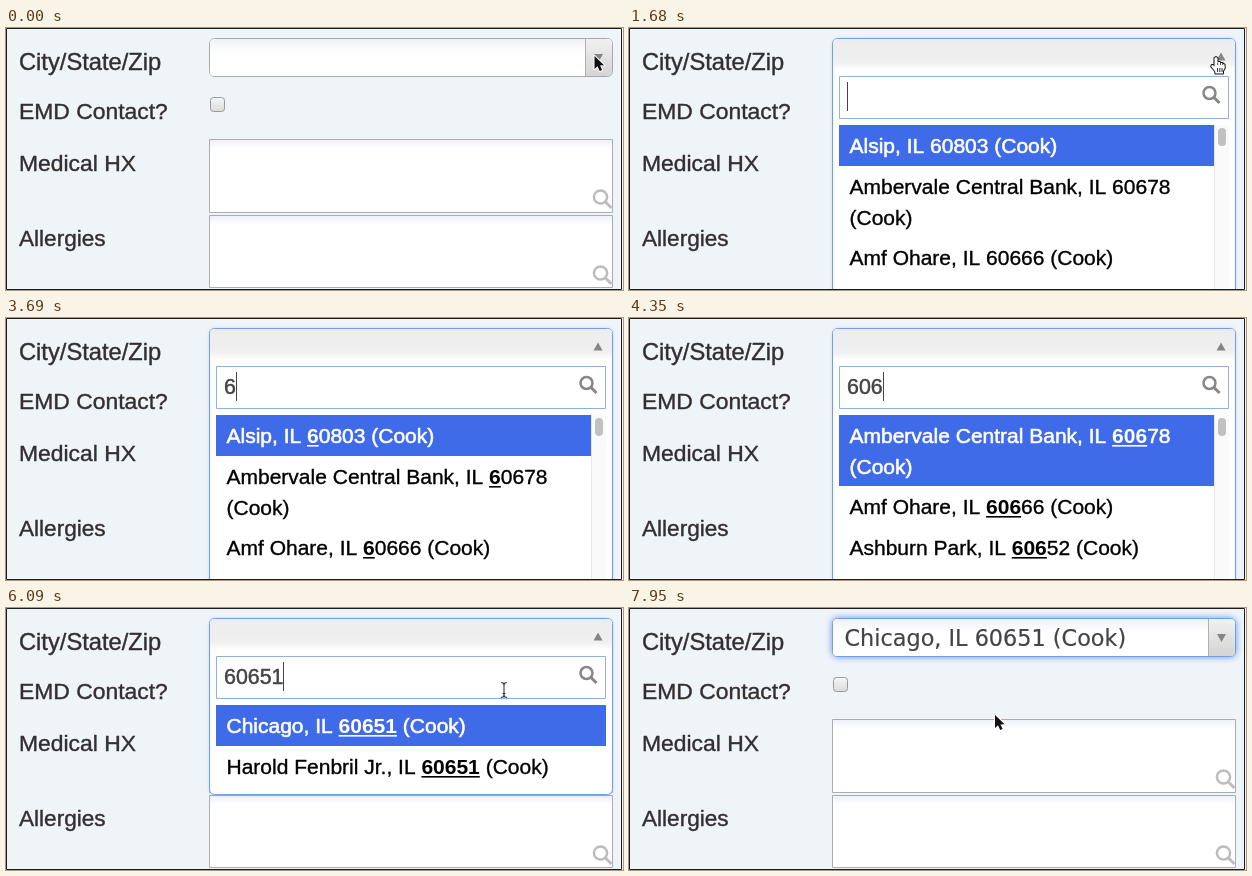
An HTML page with a canvas that plays this animation: 617 px wide and 262 px high, repeating every 8 s.

```html
<!DOCTYPE html>
<html lang="en">
<head>
<meta charset="utf-8">
<title>City picker</title>
<style>
  html, body { margin: 0; width: 617px; height: 262px; overflow: hidden; }
  canvas { display: block; }
</style>
</head>
<body>
<canvas id="stage" width="617" height="262"></canvas>
<script>
const ctx = document.getElementById('stage').getContext('2d');
const LOOP = 8000, STEP = 30;
const OPEN = 1680, CLOSE = 6840;
const SANS = '"Liberation Sans", Arial, sans-serif';
const BLUE = '#6f9fe8', PAGE = '#eff4f9';

const keys = [[3600, '6'], [3870, '60'], [4020, '606'], [4470, '6065'], [4920, '60651']];
const caretOff = [[2160, 2430], [2910, 3180], [5400, 5760], [6240, 6510]];

const bank = ['Ambervale Central Bank', '60678'];
const alsip = ['Alsip', '60803'], ohare = ['Amf Ohare', '60666'];
const ashburn = ['Ashburn Park', '60652'], chicago = ['Chicago', '60651'];

function results(query) {
  if (query.length < 3) return [alsip, bank, ohare];
  if (query === '606') return [bank, ohare, ashburn];
  if (query === '6065') return [ashburn, chicago, ['Chicago', '60652'], ['Chicago', '60655']];
  return [chicago, ['Harold Fenbril Jr.', '60651']];
}

// Pointer track: time, x, y
const toSearch = [[2400, 587, 29], [2460, 550, 47], [2550, 495, 71], [2730, 484.5, 79]];
const toResult = [[6090, 498, 82], [6240, 484, 85], [6450, 430, 99], [6600, 391, 109], [6720, 380, 112]];
const toRest = [[7650, 380, 112], [7740, 375, 110], [7920, 366, 107]];

function along(track, t) {
  if (t <= track[0][0]) return track[0].slice(1);
  for (let i = 1; i < track.length; i++) {
    const a = track[i - 1], b = track[i];
    if (t < b[0]) {
      const k = (t - a[0]) / (b[0] - a[0]);
      return [a[1] + (b[1] - a[1]) * k, a[2] + (b[2] - a[2]) * k];
    }
  }
  return track[track.length - 1].slice(1);
}

function vertical(y0, y1, ...stops) {
  const g = ctx.createLinearGradient(0, y0, 0, y1);
  stops.forEach((c, i) => g.addColorStop(i / (stops.length - 1), c));
  return g;
}

function box(x, y, w, h, r, fill, stroke) {
  ctx.beginPath();
  ctx.roundRect(x, y, w, h, r);
  if (fill) { ctx.fillStyle = fill; ctx.fill(); }
  if (stroke) { ctx.strokeStyle = stroke; ctx.lineWidth = 1; ctx.stroke(); }
}

function rect(x, y, w, h, fill) {
  ctx.fillStyle = fill;
  ctx.fillRect(x, y, w, h);
}

function poly(points, fill, stroke, width = 1) {
  ctx.beginPath();
  points.forEach(([x, y]) => ctx.lineTo(x, y));
  ctx.closePath();
  if (stroke) { ctx.strokeStyle = stroke; ctx.lineWidth = width; ctx.stroke(); }
  ctx.fillStyle = fill;
  ctx.fill();
}

// Draws text and returns the x where it ends
function text(str, x, y, size, color, { weight = '', family = SANS, thicken = 0.4 } = {}) {
  ctx.font = `${weight} ${size}px ${family}`;
  ctx.fillStyle = ctx.strokeStyle = color;
  ctx.lineWidth = thicken;
  ctx.lineJoin = 'round';
  ctx.fillText(str, x, y);
  if (thicken) ctx.strokeText(str, x, y);
  return x + ctx.measureText(str).width;
}

function lens(x, y, r, reach, color) {
  ctx.strokeStyle = color;
  ctx.lineWidth = 2.5;
  ctx.beginPath();
  ctx.arc(x, y, r, 0, Math.PI * 2);
  ctx.stroke();
  ctx.lineWidth = 3;
  ctx.beginPath();
  ctx.moveTo(x + r * 0.75, y + r * 0.75);
  ctx.lineTo(x + reach, y + reach);
  ctx.stroke();
}

function triangle(x, y, dir) {
  poly([[x - 4.5, y - 4 * dir], [x + 4.5, y - 4 * dir], [x, y + 4 * dir]], '#858585');
}

function textArea(y, h) {
  box(203.5, y + 0.5, 403, h, 0, vertical(y, y + 10, '#eceff5', '#ffffff'), '#a9acb1');
  lens(594.5, y + 58, 6.6, 11, '#bdbdbd');
}

function form() {
  rect(0, 0, 617, 262, PAGE);
  [['City/State/Zip', 42, 23.7], ['EMD Contact?', 91, 22.9], ['Medical HX', 143, 22.9], ['Allergies', 218, 22.6]]
    .forEach(([label, y, size]) => text(label, 13, y, size, '#332f31'));
  box(204.5, 69.5, 14, 14, 3, vertical(69, 84, '#f7f7f7', '#dadada'), '#999999');
  textArea(111, 73);
  textArea(187, 72);
}

function closedSelect(chosen) {
  ctx.save();
  if (chosen) { ctx.shadowColor = 'rgba(70,125,225,.75)'; ctx.shadowBlur = 6; }
  box(203.5, 10.5, 403, 38, 5, '#ffffff', chosen ? BLUE : '#a5a8ad');
  ctx.restore();
  box(204, 11, 375, 37, [4, 0, 0, 4], vertical(11, 26, '#f1f2f5', '#ffffff'));
  box(579, 11, 27, 37, [0, 4, 4, 0], vertical(11, 48, '#f1f1f1', '#d4d4d4'));
  rect(579, 11, 1, 37, '#b0b0b0');
  triangle(592.5, 30, 1);
  if (chosen) {
    text('Chicago, IL 60651 (Cook)', 215.5, 38, 22.35, '#444444', { family: '"DejaVu Sans", sans-serif', thicken: 0.2 });
  }
}

function resultRow([place, zip], query, top, right, active) {
  const size = 21, color = active ? '#ffffff' : '#000000';
  const style = { thicken: active ? 0.6 : 0.35 };
  ctx.font = `${size}px ${SANS}`;
  const head = `${place}, IL `;
  const wraps = ctx.measureText(`${head}${zip} (Cook)`).width > 355;
  const height = wraps ? 71 : 41, base = top + 28;
  if (active) rect(210, top, right - 210, height, '#406be8');
  let x = text(head, 220.5, base, size, color, style);
  if (query) {
    const end = text(query, x, base, size, color, { weight: 'bold', thicken: 0 });
    rect(x, base + 2, end - x, 1.6, color);
    x = end;
  }
  x = text(zip.slice(query.length), x, base, size, color, style);
  if (wraps) text('(Cook)', 220.5, base + 30.5, size, color, style);
  else text(' (Cook)', x, base, size, color, style);
  return top + height;
}

function openSelect(query, caret) {
  const short = query.length === 5;
  const bottom = short ? 186.5 : 290;
  ctx.save();
  ctx.shadowColor = 'rgba(60,100,180,.15)';
  ctx.shadowBlur = 3;
  box(203.5, 10.5, 403, bottom - 10.5, 5, '#ffffff', BLUE);
  ctx.restore();
  box(204, 11, 402, 31, [4, 4, 0, 0], vertical(11, 42, '#ececec', '#eeeeee', '#eeeeee', '#f0f0f0', '#ffffff'));
  triangle(592, 28.5, -1);

  box(210.5, 48.5, 389, 42, 0, '#ffffff', '#8fb1de');
  lens(580.5, 65, 6, 10, '#878787');
  const end = text(query, 218, 76, 21.4, '#444444', { thicken: 0.5 });
  if (caret) rect(Math.round(end), 54, 1, 29, '#444444');

  let top = 97;
  results(query).forEach((row, i) => {
    top = resultRow(row, query, top, short ? 600 : 585, i === 0);
  });
  if (!short) {
    rect(585, 97, 15, 165, '#fafafa');
    rect(585, 97, 1, 165, '#e8e8e8');
    box(589, 100, 8, 18, 4, '#c1c1c1');
  }
}

function arrow(x, y) {
  const shape = [[0, 0], [0, 13], [3, 10.3], [5.2, 15], [7.6, 14], [5.5, 9.4], [9.6, 9.2]]
    .map(([a, b]) => [x + a, y + b]);
  poly(shape, '#111111', '#ffffff', 2);
}

function hand(x, y) {
  ctx.save();
  ctx.translate(x, y);
  ctx.lineJoin = 'round';
  poly([[-1.5, 1], [0, 0], [1.5, 1], [1.5, 5], [4, 5], [4.3, 6], [6.5, 6], [7, 7], [8.5, 7.4], [8.8, 11],
    [7, 14], [7, 16.5], [-0.5, 16.5], [-0.8, 14.5], [-4.8, 9.4], [-4.3, 8], [-2.8, 8.2], [-1.5, 9.6]],
    '#ffffff', '#111111', 2);
  ctx.fillStyle = '#111111';
  [1.2, 3.4, 5.6].forEach(a => ctx.fillRect(a, 11, 0.9, 4));
  [1.4, 4, 6.4].forEach(a => ctx.fillRect(a, 5.5, 0.7, 2.5));
  ctx.restore();
}

function beam(x, y) {
  ctx.strokeStyle = '#333333';
  ctx.lineWidth = 1.1;
  ctx.beginPath();
  ctx.moveTo(x - 3, y - 7.5);
  ctx.quadraticCurveTo(x, y - 7.5, x, y - 5);
  ctx.lineTo(x, y + 5);
  ctx.quadraticCurveTo(x, y + 7.5, x - 3, y + 7.5);
  ctx.moveTo(x + 3, y - 7.5);
  ctx.quadraticCurveTo(x, y - 7.5, x, y - 5);
  ctx.moveTo(x, y + 5);
  ctx.quadraticCurveTo(x, y + 7.5, x + 3, y + 7.5);
  ctx.moveTo(x - 1.5, y + 3.5);
  ctx.lineTo(x + 1.5, y + 3.5);
  ctx.stroke();
}

function pointer(t) {
  if (t < 510) return arrow(588.5, 28);
  if (t < 3420) {
    const [x, y] = along(toSearch, t);
    return y < 48 ? hand(x, y) : beam(x, y);
  }
  if (t < 6090) return; // hidden while typing
  if (t < 7680) {
    const [x, y] = along(toResult, t);
    return y < 91 ? beam(x, y) : hand(x, y);
  }
  arrow(...along(toRest, t));
}

function draw(t) {
  form();
  if (t >= OPEN && t < CLOSE) {
    const typed = keys.filter(k => t >= k[0]).pop();
    openSelect(typed ? typed[1] : '', !caretOff.some(([a, b]) => t >= a && t < b));
  } else {
    closedSelect(t >= CLOSE);
  }
  pointer(t);
  box(0.5, 0.5, 615, 261, 0, null, '#1c1c1c');
}

const start = performance.now();
function tick(now) {
  const t = Math.max(0, now - start) % LOOP;
  draw(Math.floor(t / STEP) * STEP);
  requestAnimationFrame(tick);
}
draw(0);
requestAnimationFrame(tick);
</script>
</body>
</html>
```
